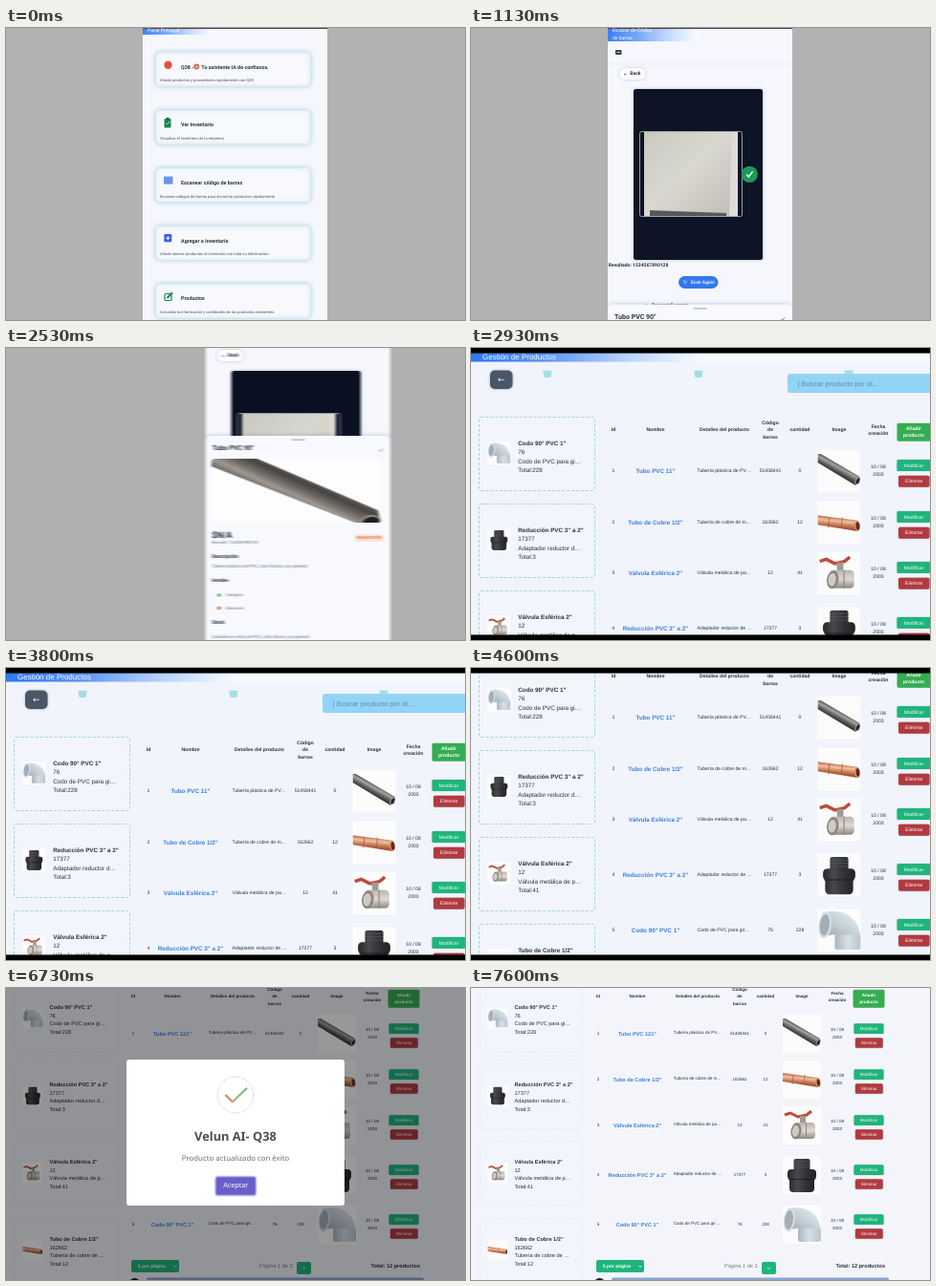
These frames come from a looping animation (480x306 px, 7670 ms). An HTML page with a canvas:

```html
<!DOCTYPE html>
<html lang="es">
<head>
<meta charset="utf-8">
<title>Inventario</title>
<style>
  html, body { margin: 0; width: 100%; height: 100%; overflow: hidden; background: #b2b2b2; }
  canvas { display: block; width: 480px; height: 306px; }
</style>
</head>
<body>
<canvas id="stage" width="480" height="306"></canvas>
<script>
const W = 480, H = 306, LOOP = 7670;
const stage = document.getElementById('stage').getContext('2d');
const buffer = document.createElement('canvas');
buffer.width = W;
buffer.height = H;
const g = buffer.getContext('2d');
const ROBOTO = 'Roboto, sans-serif';
const ARIAL = '"Liberation Sans", Arial, sans-serif';
const NOTO = '"Noto Sans", sans-serif';
const SIGNS = '"DejaVu Sans", sans-serif';
const INK = '#2b303b';

// ---------- helpers ----------
const clamp = v => Math.max(0, Math.min(1, v));
const span = (t, a, b) => clamp((t - a) / (b - a));
const inOut = u => u < .5 ? 2 * u * u : 1 - 2 * (1 - u) * (1 - u);

function text(s, x, y, size, { color = INK, weight = 400, font = ROBOTO, align = 'left' } = {}) {
  g.font = `${weight} ${size}px ${font}`;
  g.textRendering = 'geometricPrecision';
  g.textAlign = align;
  g.textBaseline = 'middle';
  g.fillStyle = color;
  g.fillText(s, x, y);
}

function rect(x, y, w, h, color) {
  g.fillStyle = color;
  g.fillRect(x, y, w, h);
}

function round(x, y, w, h, r, fill, line, lw = 1) {
  g.beginPath();
  g.roundRect(x, y, w, h, r);
  if (fill) { g.fillStyle = fill; g.fill(); }
  if (line) { g.strokeStyle = line; g.lineWidth = lw; g.stroke(); }
}

function shadowed(color, blur, draw) {
  g.save();
  g.shadowColor = color;
  g.shadowBlur = blur;
  draw();
  g.restore();
}

function ellipse(x, y, rx, ry, turn, color) {
  g.beginPath();
  g.ellipse(x, y, rx, ry, turn, 0, 7);
  g.fillStyle = color;
  g.fill();
}

const disc = (x, y, r, color) => ellipse(x, y, r, r, 0, color);

function path(points, color, lw) {
  g.beginPath();
  points.forEach(([x, y]) => g.lineTo(x, y));
  g.strokeStyle = color;
  g.lineWidth = lw;
  g.stroke();
}

function shape(points, color) {
  g.beginPath();
  points.forEach(([x, y]) => g.lineTo(x, y));
  g.closePath();
  g.fillStyle = color;
  g.fill();
}

function gradient(x0, y0, x1, y1, ...colors) {
  const fill = g.createLinearGradient(x0, y0, x1, y1);
  colors.forEach((c, i) => fill.addColorStop(i / (colors.length - 1), c));
  return fill;
}

// ---------- phone ----------
const MENU = [
  ['', 'Añade productos y proveedores rápidamente con Q38'],
  ['Ver Inventario', 'Visualiza el inventario de tu empresa'],
  ['Escanear código de barras', 'Escanea códigos de barras para encontrar productos rápidamente'],
  ['Agregar a Inventario', 'Añade nuevos productos al inventario con toda su información'],
  ['Productos', 'Actualiza la información y cantidades de los productos existentes']
];

function menuIcon(i, y) {
  if (i === 0) disc(169.5, y + 13.5, 4.2, '#e2533a');
  if (i === 1) {
    round(165.5, y + 9, 7, 9.5, 1, '#17864f');
    rect(167.5, y + 8, 3, 2, '#0f6b3d');
    path([[167.3, y + 13.6], [168.7, y + 15], [171.3, y + 12]], '#d8f2e4', .8);
  }
  if (i === 2) rect(165, y + 9, 9.5, 8, '#6a94e6');
  if (i === 3) {
    round(165.3, y + 8.8, 8, 8.2, 1, '#3f62dd');
    path([[167.3, y + 12.9], [171.3, y + 12.9]], '#fff', 1);
    path([[169.3, y + 10.9], [169.3, y + 14.9]], '#fff', 1);
  }
  if (i === 4) {
    round(166, y + 10.5, 7, 7, 1, null, '#17864f', 1.2);
    path([[168.5, y + 15], [174, y + 9.2]], '#17864f', 2);
  }
}

function header(height, width) {
  rect(143, 0, width, height, gradient(143, 0, 143 + width, 0, '#3f80f2', '#78a8f7', '#c3daff', '#fbfdff'));
  rect(143, 0, 193, 1, '#5b4348');
}

function menu() {
  header(7, 73);
  text('Panel Principal', 148, 3, 5, { color: '#fff' });
  MENU.forEach(([title, note], i) => {
    const y = 25.2 + i * 60.7;
    shadowed('rgba(130,190,205,.55)', 4, () =>
      round(156.5, y, 162, 36, 4.5, '#f7f9fd', '#d5e8ec', 1));
    menuIcon(i, y);
    const bold = { weight: 700 };
    if (i) text(title, 183, y + 15.8, 5.4, bold);
    else {
      text('Q38 -', 183, y + 15.8, 5.4, bold);
      disc(199.3, y + 15.3, 2.9, '#c9684c');
      disc(199.3, y + 15.3, 1.3, '#e9c6b5');
      text('Tu asistente IA de confianza.', 204.3, y + 15.8, 5.4, bold);
    }
    text(note, 161, y + 29.8, 4.1, { color: '#4b505b' });
  });
}

function scanner(t) {
  header(14, 95);
  text('Escáner de Código', 148, 3, 5, { color: '#fff' });
  text('de barras', 148, 10.5, 5, { color: '#fff' });
  round(151, 23, 6.5, 5, 1, '#3b414d');
  rect(152.5, 25, 3.5, 1, '#c9cdd6');
  rect(143, 37.5, 193, .8, '#e3e6ee');
  shadowed('rgba(60,70,90,.3)', 3, () => round(155.5, 42, 27, 12, 6, '#fff'));
  text('←', 159.8, 48.3, 4.6, { font: SIGNS });
  text('Back', 166.3, 48, 5, { weight: 700 });

  shadowed('rgba(20,30,60,.35)', 3, () => round(170, 64, 135, 179, 2.5, '#0c1426'));
  const live = span(t, 640, 760);
  if (live > 0) {
    g.globalAlpha *= live;
    rect(181, 109, 98, 88, gradient(181, 109, 265, 197, '#c9cabf', '#d9d8d0', '#c3bfb8'));
    shape([[187, 191], [267, 194], [267, 197], [187, 197]], '#57585a');
    shape([[273, 109], [279, 109], [279, 197], [270, 197]], '#dedcd6');
    g.globalAlpha /= live;
  }
  round(176.5, 108.5, 107, 89, 2, null, '#b9bfc4', .8);
  const done = t >= 1000;
  if (done) {
    disc(291.3, 153.3, 8.6, '#1f9a58');
    path([[288.2, 153.5], [290.3, 156], [294.6, 150.5]], '#fff', 1.3);
    text('Resultado: 1234567890128', 143.8, 248.3, 5, { weight: 700 });
  }
  round(217, 260, 41.5, 13, 6.5, '#3478ee');
  text('↻', 222, 266.5, 5, { color: '#fff', font: SIGNS });
  text(done ? 'Scan Again' : 'Scanning', 229.5, 266.3, 5, { color: '#fff', weight: 500 });
  if (done) {
    disc(183.5, 291, 1.8, '#7d828c');
    text('Request Support', 189, 291, 5, { weight: 500 });
  }
}

function pipePhoto(x, y) {
  g.save();
  round(x, y, 178, 67, 4, '#fdfdfd');
  g.clip();
  g.translate(x, y);
  shape([[0, 0], [48, 0], [174, 54], [177, 67], [150, 67], [0, 8]],
    gradient(72, 49, 88, 13, '#3f3d3b', '#6b6763', '#a09b95', '#6f6b67', '#4b4845', '#6d6966'));
  ellipse(166, 65, 11, 6, -.15, '#8b8783');
  ellipse(167, 66, 8.5, 4.8, -.15, '#232324');
  g.restore();
}

function sheet(y) {
  shadowed('rgba(60,70,100,.3)', 5, () => round(143, y, 193, 330, [5, 5, 0, 0], '#f8f9fe'));
  round(232.5, y + 3.5, 14.5, 1.6, .8, '#b8bcc7');
  text('Tubo PVC 90"', 150, y + 13, 7, { weight: 700 });
  path([[324.5, y + 15.5], [326, y + 16.5], [328, y + 13.5]], '#737985', .8);
  pipePhoto(149, y + 24);
  const bold = { weight: 700 }, soft = { color: '#6b7280' };
  text('$N/A', 149.5, y + 104, 9, bold);
  text('Barcode: 1234567890128', 149.5, y + 111.3, 4.2, soft);
  round(299, y + 103, 30, 8, 4, '#fbe3d8');
  text('NO EN STOCK', 314, y + 107.2, 4.1, { color: '#d2622f', weight: 500, align: 'center' });
  text('Descripción', 149.5, y + 126.5, 5.2, bold);
  text('Tubería plástica de PVC, color blanco, uso general', 149.5, y + 136.3, 4.5, soft);
  text('Detalles', 149.5, y + 151.7, 4.8, bold);
  ['Categoría', 'Ubicación'].forEach((s, i) => {
    round(153, y + 163 + i * 13.5, 8, 8, 2, '#fff');
    disc(157, y + 167 + i * 13.5, 1.9, i ? '#cf7052' : '#63a990');
    text(s, 164, y + 167 + i * 13.5, 4.2, soft);
  });
  text('Stock', 149.5, y + 195.5, 5.2, bold);
  text('Unidades en stock de PVC, color blanco, uso general', 149.5, y + 210.5, 4.4, soft);
}

function phone(t) {
  rect(0, 0, W, H, '#b2b2b2');
  const page = span(t, 470, 600);
  g.save();
  g.beginPath();
  g.rect(143, 0, 193, H);
  g.clip();
  rect(143, 0, 193, H, '#f5f7fd');
  if (page < 1) menu();
  if (page > 0) {
    g.globalAlpha = page;
    g.translate(0, -40 * inOut(span(t, 1700, 2150)));
    rect(143, 0, 193, 400, '#f5f7fd');
    scanner(t);
    g.globalAlpha = 1;
    if (t > 1040) sheet(306 - 174 * inOut(span(t, 1040, 1460)));
  }
  g.restore();
}

// ---------- product pictures, drawn in a 40 px box ----------
const PICTURES = {
  tube() {
    shape([[-20, -16], [-17, -16], [19, 5], [19, 11], [15, 13], [-20, -8]],
      gradient(-3, 3, 2, -6, '#2c2c2d', '#58585a', '#a3a3a4', '#4a4a4b'));
    ellipse(17, 9, 2, 3.8, .5, '#8d8d8e');
    ellipse(17.3, 9.2, 1.2, 2.8, .5, '#1d1d1e');
  },
  copper() {
    shape([[-20, -7], [17, -2], [19, 3], [17, 8], [-20, 2]],
      gradient(0, 6, 1, -5, '#8f4a30', '#c9774f', '#f0bfa4', '#bd6c48'));
    [-9, 3].forEach(x => path([[x, -5], [x - 1, 5]], '#a85a3a', .7));
    ellipse(17, 3, 2.6, 5, -.1, '#d99b7b');
    ellipse(17.3, 3.1, 1.7, 3.7, -.1, '#5f2c1b');
  },
  valve() {
    path([[-18, -11], [-12, -13], [-4, -9], [5, -11], [10, -15]], '#bf4a3a', 3);
    rect(-2, -10, 6, 9, '#a09a92');
    round(-9, -3, 23, 17, 4, gradient(0, -3, 0, 14, '#b9b4ac', '#ded9d2', '#8f8981'));
    rect(4, -3, 1, 17, '#8d877f');
    ellipse(-6, 6, 5.5, 8.5, .15, '#8b867e');
    ellipse(-6.5, 6, 3.6, 6, .15, '#cfcac3');
  },
  reducer() {
    const body = gradient(-15, 0, 15, 0, '#27282b', '#48494d', '#303135', '#222326');
    round(-8.5, -17, 17, 15, 2, body);
    [-14, -11, -8].forEach(y => path([[-8, y], [8, y]], '#54565a', .7));
    round(-15, -6, 30, 11, 4, body);
    round(-13, 0, 26, 18, 4, body);
    path([[-14, 4.5], [14, 4.5]], '#1c1d1f', .9);
  },
  elbow() {
    g.beginPath();
    g.moveTo(-13, -6);
    g.bezierCurveTo(1, -9, 9, -4, 9, 10);
    g.strokeStyle = gradient(-6, 10, 12, -16, '#9fabb4', '#c3ced6', '#e2e9ee');
    g.lineWidth = 22;
    g.stroke();
    round(-4, 4, 24, 14, 2.5, gradient(-4, 0, 20, 0, '#aab6bf', '#d6dfe5', '#bac5cd'));
    ellipse(-13, -5, 6, 12.5, .12, '#d5dde3');
    ellipse(-13.5, -5, 4.4, 10, .12, '#a3afb8');
  }
};

function picture(kind, x, y, size) {
  g.save();
  g.translate(x, y);
  g.scale(size / 40, size / 40);
  rect(-20, -20, 40, 40, '#fcfcfc');
  g.beginPath();
  g.rect(-20, -20, 40, 40);
  g.clip();
  PICTURES[kind]();
  g.restore();
}

// ---------- product table ----------
const CARDS = [
  ['Codo 90° PVC 1"', '76', 'Codo de PVC para gi…', '228', 'elbow'],
  ['Reducción PVC 3" a 2"', '17377', 'Adaptador reductor d…', '3', 'reducer'],
  ['Válvula Esférica 2"', '12', 'Válvula metálica de p…', '41', 'valve'],
  ['Tubo de Cobre 1/2"', '162662', 'Tubería de cobre de …', '12', 'copper']
];
const ROWS = [
  ['Tubo PVC 121"', 'Tubería plástica de PV…', '51458441', '0', 'tube'],
  ['Tubo de Cobre 1/2"', 'Tubería de cobre de m…', '162662', '12', 'copper'],
  ['Válvula Esférica 2"', 'Válvula metálica de pa…', '12', '41', 'valve'],
  ['Reducción PVC 3" a 2"', 'Adaptador reductor de …', '17377', '3', 'reducer'],
  ['Codo 90° PVC 1"', 'Codo de PVC para gir…', '76', '228', 'elbow']
];
const HEADS = [['Id'], ['Nombre'], ['Detalles del producto'], ['Código', 'de', 'barras'],
  ['cantidad'], ['Image'], ['Fecha', 'creación']];

const WIDE = {
  size: 6.3, line: 9.4, pic: 45, head: 86, foot: 398, dash: 'rgba(110,195,205,.6)',
  card: { x: 8, y: 72, w: 122, h: 78, gap: 91, pad: 28 },
  cols: [149, 193, 265, 313, 344, 385, 426, 463], rows: [129, 183, 236, 294, 352]
};
const LIST = {
  size: 5.6, line: 8.6, pic: 40, head: 9, foot: 291, dash: 'rgba(150,170,190,.13)',
  card: { x: 9, y: -2, w: 108, h: 69, gap: 81, pad: 22.7 },
  cols: [133, 174, 237, 281, 308, 346, 383, 416], rows: [48, 96, 144, 196, 248]
};
const EDIT = {
  ...LIST, foot: 306,
  cols: [133, 173, 247, 299, 327, 364, 401, 438], rows: [56, 111, 159, 211, 263]
};

function button(s, x, y, w, h, color, size) {
  shadowed('rgba(60,80,100,.35)', 1.5, () => round(x - w / 2, y - h / 2, w, h, 1.6, color));
  text(s, x, y + .2, size, { color: '#fff', font: ARIAL, align: 'center' });
}

function cards(o) {
  const c = o.card;
  CARDS.forEach(([name, code, note, total, kind], i) => {
    const y = c.y + i * c.gap, x = c.x + c.w * .338;
    g.setLineDash([3, 2]);
    round(c.x + .5, y + .5, c.w - 1, c.h - 1, 2, '#f2f5fb', o.dash, 1);
    g.setLineDash([]);
    picture(kind, c.x + c.w * .175, y + c.h * .49, o.pic * .53);
    [name, code, note, 'Total:' + total].forEach((s, n) =>
      text(s, x, y + c.pad + n * o.line, o.size, { font: ARIAL, weight: n ? 400 : 700 }));
  });
}

function editRow(y, t) {
  const green = '#62bd98', small = { font: ARIAL };
  const name = t < 5020 ? 'Tubo PVC 11"' : t < 5120 ? 'Tubo PVC 1"' : t < 5220 ? 'Tubo PVC 12"' : 'Tubo PVC 121"';
  round(143, y - 6, 61, 12, 2, '#fbfdfd', green, .9);
  text(name, 150, y, 4.6, small);
  rect(212, y - 6, 71, 12, '#fdfdfe');
  g.save();
  g.beginPath();
  g.rect(210, y - 7, 74, 13);
  g.clip();
  text('Tubería plástica de PVC color', 213.5, y - 4.5, 4.55, small);
  text('blanco, uso general', 213.5, y + 5.5, 4.55, small);
  g.restore();
  round(318, y - 6, 19, 12, 2, '#fbfdfd', green, .9);
  text('0', 321, y, 4.6, small);
  round(328.5, y - 4, 6, 8, 1, '#e4e6ea');
  path([[330.3, y - 1], [331.5, y - 2.2], [332.7, y - 1]], INK, .6);
  path([[330.3, y + 1], [331.5, y + 2.2], [332.7, y + 1]], INK, .6);
  round(346, y - 27, 27, 10, 1, '#efeff1', '#8a8e95', .6);
  text('Examinar...', 359.5, y - 22, 4.5, { font: ARIAL, align: 'center' });
  text('...', 376, y - 22, 4.5, small);
}

function table(o, t) {
  const k = o.size / 6.3, small = o.size * .81, c = o.cols, editing = o === EDIT;
  const mid = { font: ARIAL, align: 'center' };
  HEADS.forEach((lines, i) => lines.forEach((s, n) =>
    text(s, c[i], o.head + (n - (lines.length - 1) / 2) * 7.4, small, { ...mid, weight: 700 })));
  const addW = editing ? 39 : 33 * (k > .95 ? 1.06 : 1);
  round(c[7] - addW / 2, o.head - 7.3, addW, 19, 1.6, '#35ad52');
  ['Añadir', 'producto'].forEach((s, n) =>
    text(s, c[7], o.head - 1 + n * 6.8, small, { ...mid, color: '#fff', weight: 700 }));

  ROWS.forEach(([name, note, code, count, kind], i) => {
    const y = o.rows[i], open = editing && i === 0;
    text(String(i + 1), c[0], y, small, mid);
    if (open) editRow(y, t);
    else {
      const label = i === 0 && o === WIDE ? 'Tubo PVC 11"' : name;
      text(label, c[1], y + .3, o.size, { ...mid, weight: 700, color: '#3d7fdc' });
      text(note, c[2] - 28.5 * k, y - .8, small, { font: ARIAL });
      text(count, c[4], y, small, mid);
    }
    text(code, c[3], y, small, mid);
    picture(kind, c[5], open ? y + 7.5 : y, o.pic);
    text('10 / 08', c[6], y - 4, small, mid);
    text('2003', c[6], y + 4, small, mid);
    const saving = open ? (t < 5430 ? 'Guardar' : 'Guardando…') : 'Modificar';
    button(saving, c[7], y - 6 * k, open ? 40 : 35 * k, 12 * k, '#1eb57c', small);
    button('Eliminar', c[7] + .3, y + 10.7 * k, 32.5 * k, 12 * k, '#b03a3f', small);
  });

  const f = o.foot;
  round(131, f - 6, 50, 13, 2, '#1eb57c');
  text('5 por página', 138, f + .3, 4.9, { font: ARIAL, color: '#fff', weight: 700 });
  path([[175.5, f], [177, f + 1.5], [178.5, f]], '#fff', .8);
  text('Página 1 de 3', 265, f, 5.6, { font: ARIAL, color: '#777c86' });
  round(304, f - 4, 15, 13, 2, '#1eb57c');
  path([[310, f + 2], [311.5, f + 3.5], [313, f + 2]], '#fff', .8);
  text('Total: 12 productos', 433, f, 5.6, { font: ARIAL, weight: 700, align: 'right' });
  round(147, f + 12.5, 290, 10, 2, '#8ea6d3');
  disc(134.5, f + 19, 6, '#17191d');
}

function wide(t) {
  rect(0, 0, W, H, '#f1f4fb');
  g.save();
  g.translate(0, -77 * inOut(span(t, 4080, 4560)));
  rect(0, 5, 240, 9.5, gradient(0, 0, 240, 0, '#2f78f3', '#5c97f8', '#b5d2fd', '#f8fbff'));
  rect(240, 5, 240, 9.5, '#f7f9fd');
  text('Gestión de Productos', 12, 9.8, 8, { color: '#fff', font: ARIAL });
  [80, 238, 395].forEach(x => {
    round(x - 4, 24, 8, 7, 2, 'rgba(115,205,220,.6)');
    rect(x - 5, 23.5, 10, 2, 'rgba(150,220,232,.6)');
  });
  shadowed('rgba(60,70,90,.4)', 3, () => round(20, 23.5, 23.5, 19.5, 5, '#4b5568'));
  text('←', 31.7, 33.5, 9, { color: '#fff', align: 'center', font: SIGNS });
  round(331, 27, 155, 20, 3, '#92d4f6');
  text('| Buscar producto por id...', 341.5, 37.5, 7.4, { color: '#6289a4', font: ARIAL });
  cards(WIDE);
  table(WIDE, t);
  g.restore();
  rect(0, 0, W, 5.5, '#000');
  rect(0, 300.5, W, 6, '#000');
}

// ---------- success message ----------
function popScale(t) {
  const u = span(t, 5580, 5860);
  if (u < .45) return .7 + .35 * u / .45;
  if (u < .8) return 1.05 - .1 * (u - .45) / .35;
  return .95 + .05 * (u - .8) / .2;
}

function message(t) {
  const leave = span(t, 7240, 7370);
  const shade = span(t, 5540, 5600) * (1 - span(t, 7270, 7440));
  if (shade > 0) rect(0, 0, W, H, `rgba(0,0,0,${.4 * shade})`);
  if (t < 5580 || leave >= 1) return;
  const s = popScale(t) * (1 - .5 * leave);
  g.save();
  g.globalAlpha = span(t, 5570, 5650) * (1 - leave);
  g.translate(240, 151.5);
  g.scale(s, s);
  g.translate(-240, -151.5);
  round(126, 75, 228, 153, 3, '#fefffe');
  g.setLineDash([1.2, 1.5]);
  g.beginPath();
  g.arc(240, 112, 18.8, 0, 7);
  g.strokeStyle = '#b3cdbc';
  g.lineWidth = 1;
  g.stroke();
  g.setLineDash([]);
  const a = span(t, 5760, 5900), b = span(t, 5900, 6120);
  if (a > 0) path([[229.5, 112], [229.5 + 7.5 * a, 112 + 7.5 * a]], '#d98463', 2.2);
  if (b > 0) path([[236.5, 119.8], [236.5 + 15.5 * b, 119.8 - 15 * b]],
    gradient(236, 120, 252, 105, '#b4b878', '#5fbf86'), 2.2);
  text('Velun AI- Q38', 240, 156.5, 12.8, { font: NOTO, weight: 600, color: '#4c4d52', align: 'center' });
  text('Producto actualizado con éxito', 240, 179, 7.8, { font: NOTO, color: '#6d6e73', align: 'center' });
  round(219, 197.5, 42.5, 20, 3, '#6a5fca', '#b9b3ea', 1.6);
  text('Aceptar', 240.2, 207.3, 7.2, { font: NOTO, color: '#fff', weight: 500, align: 'center' });
  g.restore();
}

function list(t) {
  rect(0, 0, W, H, '#f3f5fb');
  const o = t < 5740 ? EDIT : LIST;
  cards(o);
  table(o, t);
  if (o === EDIT) rect(478.6, 42, 1.4, 195, '#60646b');
  message(t);
}

// ---------- timeline ----------
// Shows the buffer shifted by dx, with mirrored edges and a sideways blur.
function slide(dx, blur) {
  const copies = blur > .5 ? 10 : 1;
  stage.fillStyle = '#b2b2b2';
  stage.fillRect(0, 0, W, H);
  for (let i = 0; i < copies; i++) {
    const x = dx + (copies > 1 ? (i / (copies - 1) - .5) * blur : 0);
    stage.globalAlpha = 1 / (i + 1);
    stage.drawImage(buffer, x, 0);
    if (!x) continue;
    stage.save();
    stage.translate(x > 0 ? x : x + 2 * W, 0);
    stage.scale(-1, 1);
    stage.drawImage(buffer, 0, 0);
    stage.restore();
  }
  stage.globalAlpha = 1;
}

function draw(t) {
  let dx = 0, blur = 0;
  if (t < 2640) {
    phone(t);
    const u = span(t, 2420, 2640);
    dx = 512 * u ** 3;
    blur = 16 * u * u;
  } else if (t < 4830) {
    wide(t);
    const u = 1 - span(t, 2640, 2950);
    dx = -480 * u ** 3;
    blur = 16 * u * u;
  } else list(t);
  slide(dx, blur);
}

const start = performance.now();
function tick() {
  draw((performance.now() - start) % LOOP);
  requestAnimationFrame(tick);
}
tick();
</script>
</body>
</html>
```
